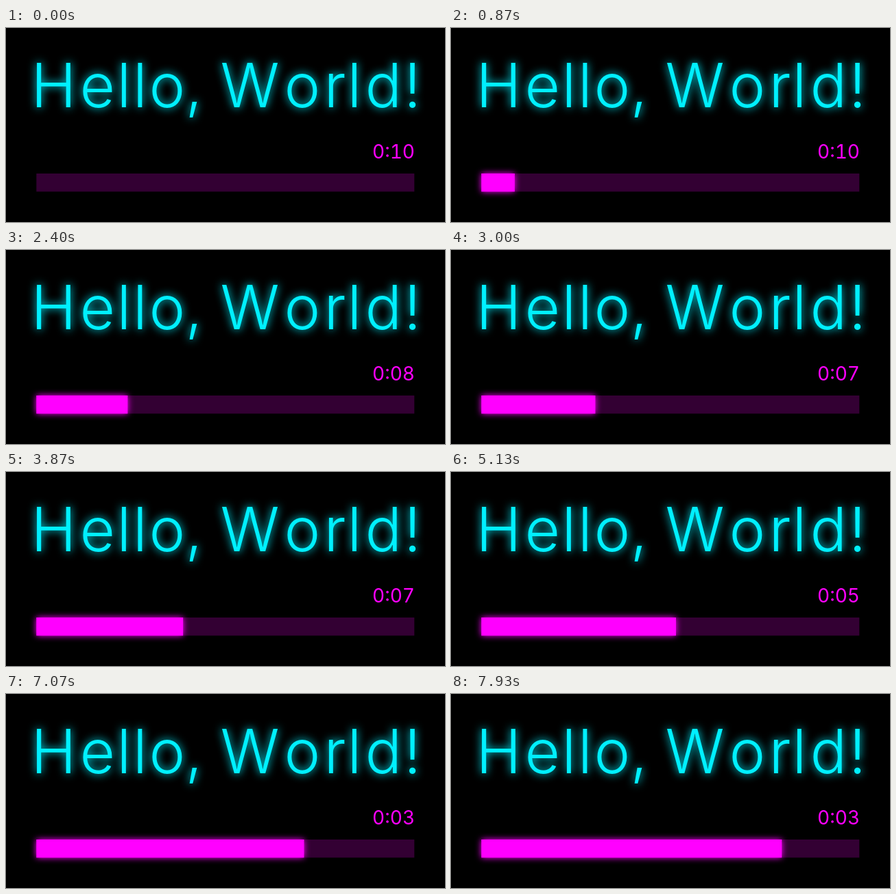
An HTML page with a canvas for the animation above (8000 ms loop, 640 px wide and 284 px high).

```html
<!DOCTYPE html>
<html lang="en">
<head>
<meta charset="utf-8">
<title>Hello, World!</title>
<style>
  html, body { margin: 0; width: 100%; height: 100%; overflow: hidden; background: #000; }
  canvas { display: block; }
  #clock {
    position: absolute; left: 0; top: 167px; width: 596px;
    font: 400 28px/28px Inter, sans-serif;
    font-variant-numeric: tabular-nums;
    text-align: right; color: #f0f;
  }
</style>
</head>
<body>
<canvas id="stage" width="640" height="284"></canvas>
<div id="clock">0:10</div>
<script>
const stage = document.getElementById('stage');
const clock = document.getElementById('clock');
const ctx = stage.getContext('2d');
const LOOP = 8000, FPS = 15, TOTAL = 10;
const CYAN = '#00f0ff', PINK = '#ff00ff';
const BAR = { x: 44.3, y: 213, w: 551, h: 26.5 };

// Each letter with the centre of its ink
const TITLE = [
  ['H', 69.5], ['e', 133], ['l', 172], ['l', 195.5], ['o', 234.5], [',', 273],
  ['W', 355.5], ['o', 431.5], ['r', 482], ['l', 508], ['d', 549], ['!', 592.5]
];

// The letters share one layer, so that their glows do not add up
function makeTitle() {
  const layer = document.createElement('canvas');
  layer.width = stage.width;
  layer.height = stage.height;
  const pen = layer.getContext('2d');
  pen.font = '300 89px Inter, sans-serif';
  pen.fillStyle = CYAN;
  for (const [char, center] of TITLE) {
    const m = pen.measureText(char);
    const offset = (m.actualBoundingBoxRight - m.actualBoundingBoxLeft) / 2;
    pen.fillText(char, center - offset, 115.5);
  }
  return layer;
}

function glow(color, blur) {
  ctx.shadowColor = color;
  ctx.shadowBlur = blur;
}

function drawBar(seconds) {
  ctx.shadowBlur = 0;
  ctx.fillStyle = '#330033';
  ctx.fillRect(BAR.x, BAR.y, BAR.w, BAR.h);
  if (!seconds) return;
  ctx.fillStyle = PINK;
  glow(PINK, 10);
  ctx.fillRect(BAR.x, BAR.y, BAR.w * seconds / TOTAL + 0.8, BAR.h);
}

function draw(now) {
  const steps = LOOP * FPS / 1000;
  const seconds = Math.floor((now + 3.4) * FPS / 1000) % steps / FPS;
  ctx.shadowBlur = 0;
  ctx.fillStyle = '#000';
  ctx.fillRect(0, 0, stage.width, stage.height);
  glow(CYAN, 13);
  ctx.drawImage(title, 0, 0);
  drawBar(seconds);
  const left = TOTAL - Math.floor(seconds);
  clock.textContent = '0:' + String(left).padStart(2, '0');
}

const title = makeTitle();
const start = performance.now();
function tick() {
  draw(performance.now() - start);
  requestAnimationFrame(tick);
}
tick();
</script>
</body>
</html>
```
